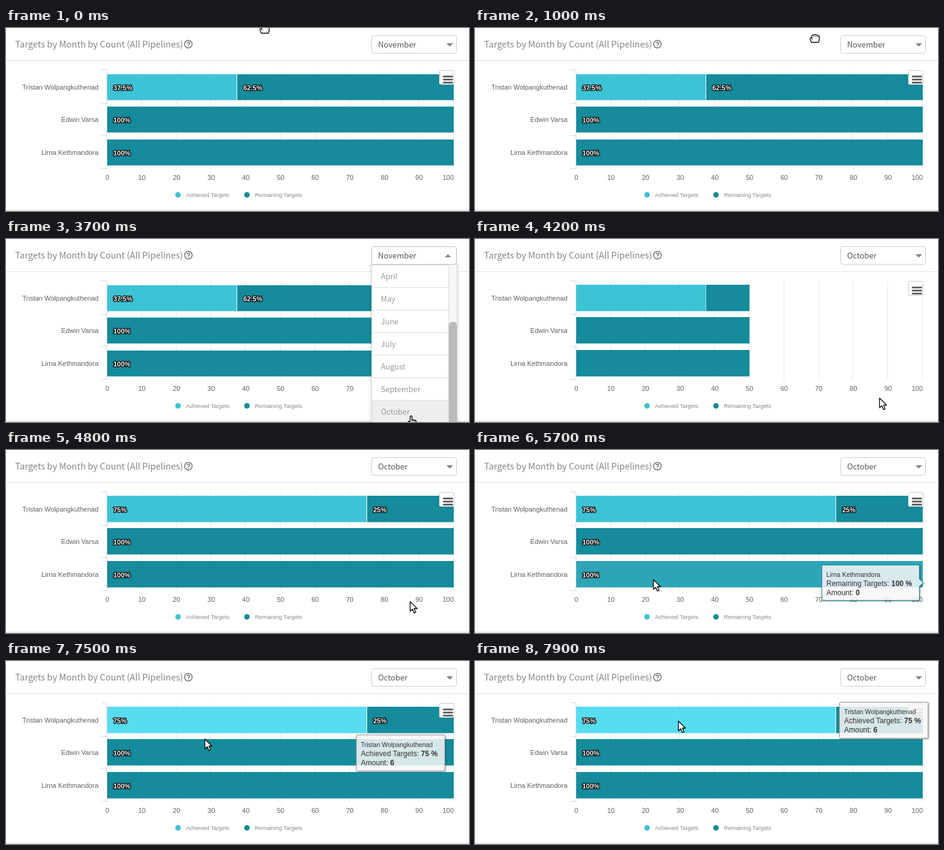
Recreate the animation shown at these times as an HTML page. Size 759 px wide and 300 px high, loop 8 s.

```html
<!DOCTYPE html>
<html lang="en">
<head>
<meta charset="utf-8">
<title>Targets by month</title>
<style>
  html, body { margin: 0; width: 100%; height: 100%; overflow: hidden; background: #fff; }
  svg { display: block; width: 759px; height: 300px; }
  text { font-family: "Liberation Sans", Arial, sans-serif; font-size: 11px; fill: #606060; white-space: pre; }
  .ui { font-family: "Noto Sans CJK SC", "Noto Sans CJK JP", "Noto Sans CJK", "Open Sans", sans-serif; }
  .title { font-size: 14.5px; fill: #85868a; }
  .value { font-size: 12.8px; fill: #555; }
  .item { font-size: 12.6px; font-weight: 300; fill: #999; }
  .end { text-anchor: end; }
  .mid { text-anchor: middle; }
  .legend { font-size: 9.3px; fill: #85888f; }
  .label { font-weight: bold; fill: #fff; stroke: #000; stroke-width: 2.6px; stroke-linejoin: round; paint-order: stroke; }
  .tip text { font-size: 12px; fill: #333; }
  .tip .head { font-size: 10.4px; }
  .cursor { fill: #fff; stroke: #000; stroke-width: 1.3; stroke-linejoin: round; }
</style>
</head>
<body>
<svg viewBox="0 0 759 300">
  <rect width="759" height="300" fill="#fff"/>
  <path d="M0 53.5H759" stroke="#e0e0e0"/>
  <path d="M0 298.5H759" stroke="#d8d8d8"/>
  <path d="M0 299.5H759" stroke="#f0f0f0"/>
  <text class="ui title" x="15" y="32">Targets by Month by Count (All Pipelines)</text>
  <circle cx="299" cy="26.5" r="6.2" fill="none" stroke="#747679" stroke-width="1.5"/>
  <path d="M296.9 25.2Q297 23.3 299 23.3Q301.1 23.3 301.1 25.1Q301 26.2 299.1 27.2V28M299 29.2V30.6" fill="none" stroke="#747679" stroke-width="1.6"/>

  <g id="chart">
    <path id="grid" stroke="#e6e6e6" fill="none"/>
    <g id="axis"></g>
    <g id="bars"></g>
    <path d="M165.5 69V231M156 68.5H165.5M156 123.5H165.5M156 176.5H165.5M156 230.5H165.5" stroke="#ccd6eb" fill="none"/>
    <g id="labels"></g>
    <circle cx="282" cy="273.5" r="4.5" fill="#3dc3d6"/>
    <text class="legend" x="295" y="277">Achieved Targets</text>
    <circle cx="395" cy="273.5" r="4.5" fill="#158b9b"/>
    <text class="legend" x="408" y="277">Remaining Targets</text>
    <rect x="710.5" y="69.5" width="24" height="23" rx="2" fill="#fff" stroke="#ccc"/>
    <path d="M717.5 79.5H731.5M717.5 84.5H731.5M717.5 89.5H731.5" stroke="#666" stroke-width="3" stroke-linecap="round"/>
  </g>

  <g class="tip" id="tip">
    <g id="tipShape" fill="none"></g>
    <text class="head" id="tipName" x="7.5" y="19.5"></text>
    <text x="7.5" y="34.5"><tspan id="tipSeries"></tspan><tspan id="tipShare" font-weight="bold"></tspan></text>
    <text x="7.5" y="49.5">Amount: <tspan id="tipAmount" font-weight="bold"></tspan></text>
  </g>

  <clipPath id="listClip"><rect x="600" y="42" width="139" height="258"/></clipPath>
  <g id="menu">
    <g fill="none" stroke="#000" stroke-opacity=".025">
      <rect x="599.5" y="45" width="140" height="300" stroke-width="4"/>
      <rect x="599.5" y="45" width="140" height="300" stroke-width="7"/>
      <rect x="599.5" y="45" width="140" height="300" stroke-width="10"/>
    </g>
    <rect x="599.5" y="41.5" width="140" height="300" fill="#fff" stroke="#d5d5d5"/>
    <g clip-path="url(#listClip)">
      <g id="list"></g>
      <path d="M725.5 42V300" stroke="#ddd"/>
      <rect x="726" y="42" width="13" height="258" fill="#f7f7f8"/>
      <rect id="thumb" x="726" width="13" height="239" rx="5" fill="#b9babc"/>
    </g>
  </g>
  <rect id="select" x="599.5" y="12.5" width="139" height="29" rx="3" fill="#fff"/>
  <text class="ui value" id="month" x="610" y="32"></text>
  <path id="caret" fill="#85868a"/>

  <g class="cursor" id="grab">
    <path d="M-5.5 6.5L-7.5 2Q-8 -1.5 -5 -1.5L-4.5 -4.5Q-3 -6.5 -1.5 -5.5Q0 -7 2 -5.5Q4 -6.5 5 -4.5Q7.5 -5 7.5 -1.5Q8 3 6 6.5Z"/>
    <path d="M-4.5 -1V2M-1.3 -4V-2M2 -4V-2M5 -3.5V-1.5" fill="none" stroke-width="1"/>
  </g>
  <g class="cursor" id="hand">
    <path d="M-1.5 1Q0 -1 1.5 1V6L7.5 7.5Q9.5 8.5 9 11.5L7.5 17.5H0L-4.5 10.5Q-5 8 -3 9L-1.5 10.5Z"/>
    <path d="M1.5 6V9M4.2 7V9.5M6.8 8V10" fill="none" stroke-width="1"/>
  </g>
  <path class="cursor" id="arrow" d="M.5 .5V16.5L4.3 13L7 19.3L9.8 18L7 12H12Z"/>
</svg>
<script>
const $ = id => document.getElementById(id);
const LOOP = 8000, STEP = 100, LEFT = 166, WIDTH = 568, ROW = 37;
const LIGHT = '#3dc3d6', DARK = '#158b9b', LIGHT_HOVER = '#58dcef', DARK_HOVER = '#2ea5b7';
const people = ['Tristan Wolpangkuthenad', 'Edwin Varsa', 'Lirna Kethmandora'];
const tops = [75, 128, 182];
const months = ['January', 'February', 'March', 'April', 'May', 'June', 'July',
  'August', 'September', 'October', 'November', 'December'];

// Rows are [time, ...values]; values run straight between rows.
const paths = {
  grab: [[400, 424, 2], [1000, 557, 17], [1300, 623, 34]],
  hand: [[1400, 621, 25], [1600, 621, 27], [1800, 625, 75], [2300, 650, 302], [3500, 664, 302], [3700, 664, 290]],
  arrow: [[4000, 664, 285], [4300, 662, 248], [5000, 662, 248], [5300, 390, 266], [5700, 292, 212],
    [6400, 292, 212], [6800, 318, 157], [7300, 318, 157], [7700, 333, 98]],
  tip: [[6500, 568.5, 188.5], [6800, 568.5, 134.5], [7400, 568.5, 134.5], [7900, 597.5, 67.5]],
  scroll: [[2600, 0], [3500, 110]],
  open: [[1500, 0], [1800, 1], [3800, 1], [4000, 0]],
  tipFade: [[5300, 0], [5700, 1]]
};

function at(rows, t) {
  const next = rows.findIndex(r => r[0] > t);
  if (next === 0) return rows[0].slice(1);
  if (next < 0) return rows[rows.length - 1].slice(1);
  const a = rows[next - 1], b = rows[next], k = (t - a[0]) / (b[0] - a[0]);
  return a.slice(1).map((v, i) => v + (b[i + 1] - v) * k);
}
const between = (t, a, b) => t >= a && t < b;
const set = (el, attrs) => { for (const k in attrs) el.setAttribute(k, attrs[k]); };
const show = (el, on) => set(el, { visibility: on ? 'visible' : 'hidden' });
const rect = (x, y, w, h, fill) => `<rect x="${x}" y="${y}" width="${w}" height="${h}" fill="${fill}"/>`;
const label = (x, y, s) => `<text class="label" x="${x}" y="${y}">${s}%</text>`;

let grid = '', axis = '';
for (let i = 0; i <= 10; i++) {
  const x = LEFT + i * WIDTH / 10;
  grid += `M${Math.round(x) - .5} 69V231`;
  axis += `<text class="${i < 10 ? 'mid' : 'end'}" x="${x}" y="249">${i * 10}</text>`;
}
people.forEach((name, i) => axis += `<text class="end" x="151.5" y="${tops[i] + 26}">${name}</text>`);
set($('grid'), { d: grid });
$('axis').innerHTML = axis;
$('list').innerHTML = months.map((m, i) => {
  const y = 42 + i * ROW;
  return rect(600, y, 126, ROW, '#fff') + `<path d="M600 ${y + 36.5}H726" stroke="#e0e0e0"/>` +
    `<text class="ui item" x="614.5" y="${y + 23}">${m}</text>`;
}).join('');
const itemRects = [...$('list').querySelectorAll('rect')];

function drawBars(t, hover) {
  const share = t < 4000 ? 37.5 : 75;
  const inset = t < 4000 ? .8 : 0;
  const split = LEFT + WIDTH * share / 100;
  const k = Math.min(1, Math.max(0, (t - 3900) / 600));
  const grow = t < 4000 ? 1 : .5 - Math.cos(k * Math.PI) / 2;
  const bar = (row, x, w, fill) => rect(x, tops[row] + inset, w, 43.3 - inset, fill);
  const dark = row => bar(row, LEFT, WIDTH, hover === row ? DARK_HOVER : DARK);
  $('bars').innerHTML =
    bar(0, LEFT, split - LEFT, hover === 0 ? LIGHT_HOVER : LIGHT) +
    bar(0, split, LEFT + WIDTH - split, DARK) +
    bar(0, split - 1, 1, '#fff') + dark(1) + dark(2);
  set($('bars'), { transform: `translate(${LEFT * (1 - grow)} 0) scale(${grow} 1)` });
  $('labels').innerHTML = label(176, 102, share) + label(split + 10, 102, 100 - share) +
    label(176, 155, 100) + label(176, 209, 100);
  show($('labels'), !between(t, 4000, 4500));
}

function drawMenu(t) {
  const [open] = at(paths.open, t), [scroll] = at(paths.scroll, t);
  const isOpen = between(t, 1600, 3900);
  show($('menu'), open > 0);
  set($('menu'), { opacity: open, transform: `translate(0 ${42 * (1 - open)}) scale(1 ${open})` });
  set($('list'), { transform: `translate(0 ${-scroll})` });
  set($('thumb'), { y: 42 + scroll * .855 });
  const y = at(paths.hand, t)[1];
  const over = between(t, 1700, 2300) ? Math.floor((y - 42) / ROW) : between(t, 3500, 4000) ? 9 : -1;
  itemRects.forEach((r, i) => {
    const fading = between(t, 2300, 2700) && (i === 5 || i === 6);
    set(r, { fill: i === over ? '#eee' : fading ? '#fafafa' : '#fff' });
  });
  set($('select'), { stroke: isOpen ? '#bbb' : '#ccc' });
  set($('caret'), { d: isOpen ? 'M719.5 30H729.5L724.5 24.8Z' : 'M722 25H733L727.5 30.5Z' });
  $('month').textContent = t < 3900 ? 'November' : 'October';
}

function drawTip(t, row) {
  const [x, y] = at(paths.tip, t), [fade] = at(paths.tipFade, t);
  const first = row === 0;
  const [w, h] = first ? [145, 59] : [160, 58];
  const tail = first ? '' : 'V23L166.5 29L160 35';
  const d = `M2 0H${w - 2}Q${w} 0 ${w} 2${tail}V${h - 2}Q${w} ${h} ${w - 2} ${h}H2Q0 ${h} 0 ${h - 2}V2Q0 0 2 0Z`;
  $('tipShape').innerHTML = [5, 3, 1].map((width, i) =>
    `<path d="${d}" transform="translate(1 1)" stroke="#000" stroke-opacity="${.05 * (i + 1)}" stroke-width="${width}"/>`
  ).join('') + `<path d="${d}" fill="#f7f7f7" fill-opacity=".85" stroke="${first ? '#a0a0a0' : DARK}"/>`;
  set($('tip'), { transform: `translate(${x} ${y})`, opacity: fade });
  show($('tip'), row >= 0 && fade > 0);
  if (row < 0) return;
  $('tipName').textContent = people[row];
  $('tipSeries').textContent = first ? 'Achieved Targets: ' : 'Remaining Targets: ';
  $('tipShare').textContent = first ? '75 %' : '100 %';
  $('tipAmount').textContent = first ? '6' : '0';
}

function drawCursor(t) {
  const kind = t < 1400 ? 'grab' : t < 4000 ? 'hand' : 'arrow';
  for (const name of ['grab', 'hand', 'arrow']) {
    const [x, y] = at(paths[name], t);
    set($(name), { transform: `translate(${x} ${y})` });
    show($(name), name === kind && !between(t, 5000, 5300));
  }
}

function render(t) {
  const row = t < 5400 ? -1 : t < 6600 ? 2 : t < 7500 ? 1 : 0;
  drawBars(t, row);
  drawMenu(t);
  drawTip(t, row);
  drawCursor(t);
}

const start = performance.now();
let last = -1;
function tick() {
  const t = Math.floor((performance.now() - start) % LOOP / STEP) * STEP;
  if (t !== last) render(last = t);
  requestAnimationFrame(tick);
}
tick();
</script>
</body>
</html>
```
